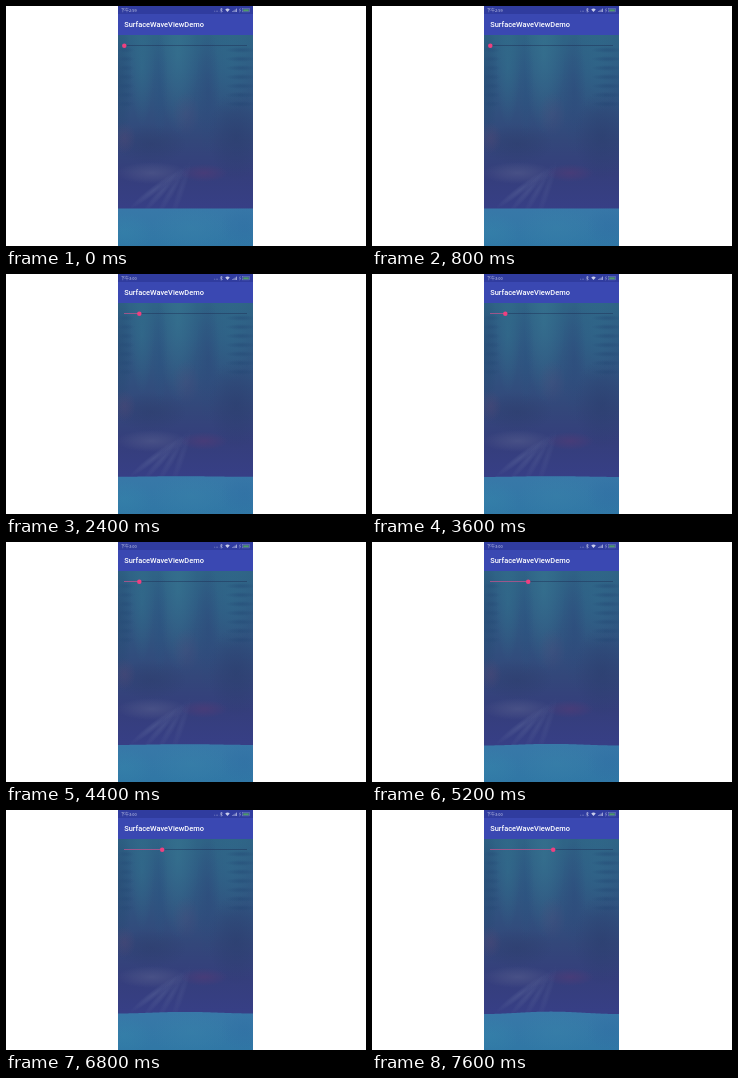
An HTML page with a canvas that plays this animation: 360x240 px, repeating every 8 s.

```html
<!DOCTYPE html>
<html>
<head>
<meta charset="utf-8">
<style>
html, body { margin: 0; width: 100%; height: 100%; overflow: hidden; background: #fff; }
canvas { display: block; width: 360px; height: 240px; }
</style>
</head>
<body>
<canvas id="stage"></canvas>
<script>
const LOOP = 8000, STEP = 400, LEFT = 112, RIGHT = 247, WIDTH = RIGHT - LEFT;
const canvas = document.getElementById('stage');
const ctx = canvas.getContext('2d');
const scale = window.devicePixelRatio || 1;
canvas.width = 360 * scale;
canvas.height = 240 * scale;

function rect(x, y, w, h, color) {
  ctx.fillStyle = color;
  ctx.fillRect(x, y, w, h);
}

function dot(x, y, r, color) {
  ctx.fillStyle = color;
  ctx.beginPath();
  ctx.arc(x, y, r, 0, Math.PI * 2);
  ctx.fill();
}

function line(points, color, width) {
  ctx.strokeStyle = color;
  ctx.lineWidth = width;
  ctx.beginPath();
  points.forEach(([x, y]) => ctx.lineTo(x, y));
  ctx.stroke();
}

function text(str, x, y, font, color) {
  ctx.font = font;
  ctx.fillStyle = color;
  ctx.fillText(str, x, y);
}

function fade(y0, y1, colors) {
  const g = ctx.createLinearGradient(0, y0, 0, y1);
  colors.forEach((c, i) => g.addColorStop(i / (colors.length - 1), c));
  return g;
}

// Soft elliptical patch of light or shade
function glow(x, y, rx, ry, rgb, alpha, angle = 0) {
  ctx.save();
  ctx.translate(x, y);
  ctx.rotate(angle);
  ctx.scale(rx, ry);
  const g = ctx.createRadialGradient(0, 0, 0, 0, 0, 1);
  g.addColorStop(0, `rgba(${rgb},${alpha})`);
  g.addColorStop(0.5, `rgba(${rgb},${alpha * 0.55})`);
  g.addColorStop(1, `rgba(${rgb},0)`);
  ctx.fillStyle = g;
  ctx.fillRect(-1, -1, 2, 2);
  ctx.restore();
}

function backdrop() {
  rect(LEFT, 29, WIDTH, 211,
    fade(29, 204, ['#2f6486', '#2f5c84', '#30527f', '#33477a', '#353e7c', '#373f86']));
  // Sky between the buildings
  glow(172, 48, 20, 80, '58,126,150', 0.45);
  glow(136, 60, 12, 60, '52,118,144', 0.4);
  glow(224, 58, 24, 50, '48,112,142', 0.35);
  // Buildings
  glow(114, 75, 12, 70, '36,72,112', 0.5);
  glow(154, 80, 8, 55, '42,82,128', 0.4);
  glow(202, 85, 12, 65, '44,72,122', 0.45);
  glow(230, 130, 28, 45, '40,58,106', 0.45);
  for (let y = 44; y < 100; y += 9) {
    glow(235, y, 16, 3, '32,66,112', 0.4);
    glow(120, y, 9, 3, '32,66,112', 0.25);
  }
  // Street
  glow(145, 138, 36, 20, '42,58,104', 0.4);
  glow(118, 132, 12, 16, '86,72,116', 0.4);
  glow(180, 108, 14, 22, '76,80,126', 0.35);
  glow(146, 167, 36, 11, '94,102,146', 0.45);
  glow(198, 167, 24, 9, '92,58,116', 0.45);
  for (let i = 0; i < 4; i++) {
    glow(148 + i * 9, 184, 30, 4, '102,114,162', 0.35 - i * 0.06, -0.65 - i * 0.2);
  }
}

function statusBar(clock) {
  rect(LEFT, 0, WIDTH, 8, '#303c9f');
  rect(LEFT, 8, WIDTH, 21, '#3a48b2');
  const pale = '#c9cdeb';
  text(clock, 115, 5.9, '4px "Noto Sans CJK SC", "Noto Sans CJK", sans-serif', pale);
  for (let i = 0; i < 3; i++) dot(208.7 + i * 1.5, 5.1, 0.4, pale);
  line([[214.2, 3], [216.4, 5.2], [215.3, 6.3], [215.3, 2], [216.4, 3.1], [214.2, 5.3]], pale, 0.5);
  ctx.fillStyle = pale;
  ctx.beginPath();
  ctx.moveTo(221.5, 6);
  ctx.arc(221.5, 6, 3.3, -Math.PI * 0.74, -Math.PI * 0.26);
  ctx.fill();
  for (let i = 0; i < 4; i++) rect(226.4 + i * 1.2, 5.3 - i * 0.9, 0.7, 0.7 + i * 0.9, pale);
  line([[234.4, 2.2], [233.3, 4.2], [234.6, 4.2], [233.6, 6.3]], pale, 0.4);
  ctx.strokeStyle = '#8f9ccb';
  ctx.lineWidth = 0.4;
  ctx.strokeRect(236.6, 2.7, 7, 3.2);
  rect(237.2, 3.3, 5.6, 2, '#4f9a6c');
  text('SurfaceWaveViewDemo', 118.2, 21.1, '500 7.45px Roboto, sans-serif', '#fff');
}

function slider(x) {
  line([[118, 39.5], [241, 39.5]], 'rgba(28,42,82,.55)', 0.8);
  line([[118, 39.5], [x, 39.5]], '#a9588f', 0.9);
  dot(x, 39.7, 2.25, '#ef4080');
}

// One swell across the width, with its crest near the middle
function water(amp, shift) {
  ctx.beginPath();
  ctx.moveTo(LEFT, 240);
  for (let x = LEFT; x <= RIGHT; x++) {
    const angle = (x - 179 - shift) / WIDTH * Math.PI * 2;
    ctx.lineTo(x, 202.4 + amp * (0.35 - Math.cos(angle)));
  }
  ctx.lineTo(RIGHT, 240);
  ctx.closePath();
  ctx.fillStyle = fade(202, 240, ['#3878a8', '#3077a5']);
  ctx.fill();
  ctx.save();
  ctx.clip();
  glow(185, 222, 40, 24, '58,134,170', 0.35);
  glow(118, 226, 30, 20, '54,138,172', 0.35);
  glow(238, 220, 24, 24, '46,106,162', 0.35);
  ctx.restore();
}

function draw(now) {
  const t = Math.floor((now % LOOP) / STEP) * STEP;
  const level = (t >= 2000) + (t >= 4800) + (t >= 7600);
  const swing = Math.cos(t / 1600 * Math.PI * 2);
  ctx.setTransform(scale, 0, 0, scale, 0, 0);
  rect(0, 0, 360, 240, '#fff');
  ctx.save();
  ctx.beginPath();
  ctx.rect(LEFT, 0, WIDTH, 240);
  ctx.clip();
  backdrop();
  water(level * 0.4 * (1 + 0.3 * swing), 4 * swing);
  statusBar(t < 1600 ? '下午2:59' : '下午3:00');
  slider([118.3, 133.3, 156.2, 181.2][level]);
  ctx.restore();
}

const start = performance.now();
function tick() {
  draw(performance.now() - start);
  requestAnimationFrame(tick);
}
tick();
</script>
</body>
</html>
```
